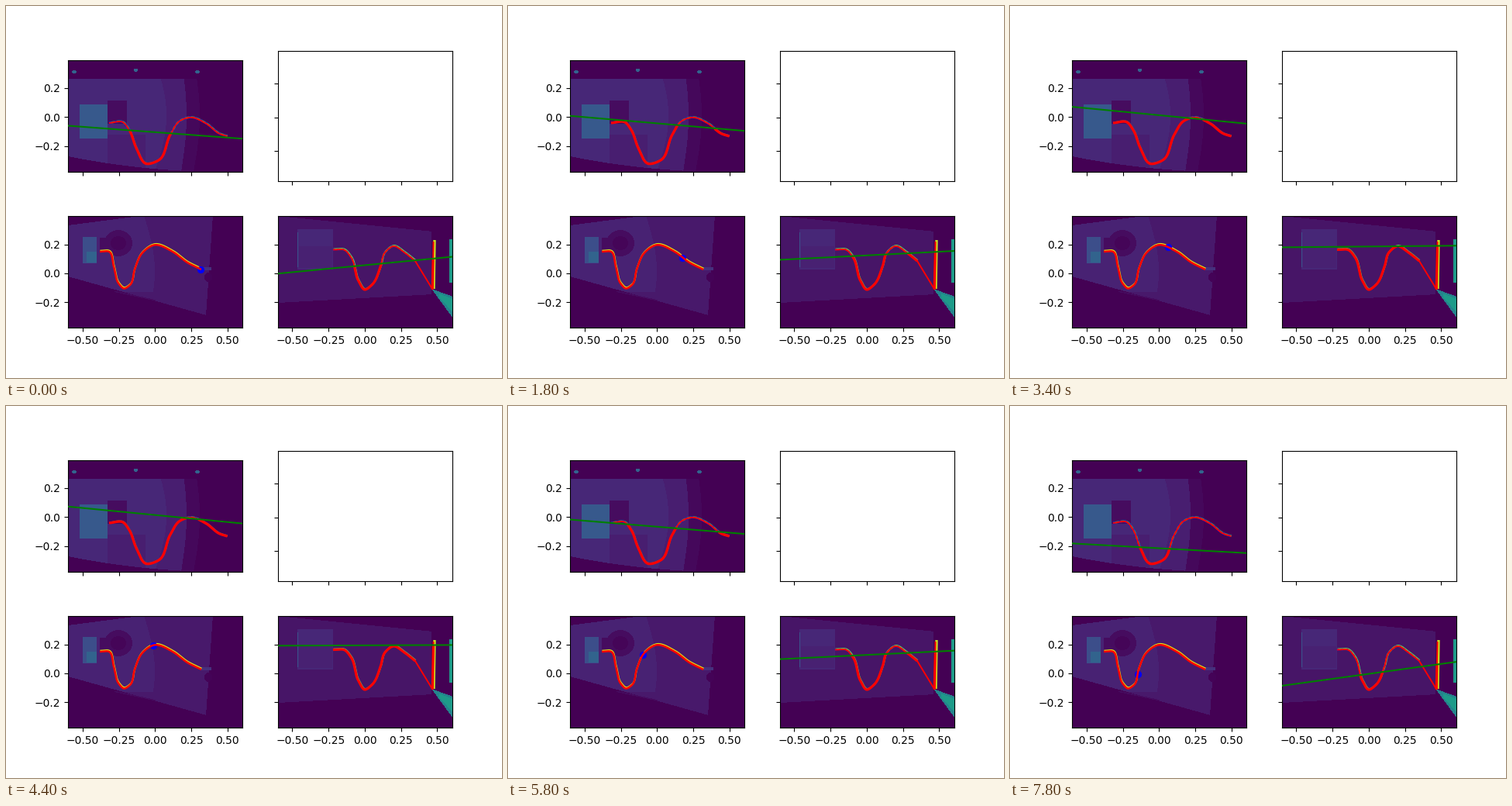
These frames come from a looping animation (640x480 px, 8000 ms). A matplotlib script:

```python
import numpy as np
import matplotlib.pyplot as plt
from matplotlib.animation import FuncAnimation

FRAMES, STEP = 40, 200
SCALE = 187.05                  # pixels per data unit
XLIM, YLIM = (-0.6009, 0.6044), (-0.3759, 0.3949)
VIR = plt.get_cmap("viridis")

fig, axes = plt.subplots(2, 2, sharex=True, sharey=True,
                         figsize=(6.4, 4.8), dpi=100)
top, side, right = axes[0, 0], axes[1, 0], axes[1, 1]
ORIGIN = {top: (192.4, 143.4), side: (192.4, 345), right: (462.95, 345)}
top.set(xlim=XLIM, ylim=YLIM, xticks=np.arange(-2, 3) * 0.25,
        yticks=[-0.2, 0, 0.2])


def to_data(ax, pts):
    """Stage pixels to the data units of one panel."""
    ox, oy = ORIGIN[ax]
    x, y = np.asarray(pts, float).T
    return (x - ox) / SCALE, (oy - y) / SCALE


def line(ax, pts, color, width, z, style="-"):
    return ax.plot(*to_data(ax, pts), style, color=color, lw=width, zorder=z,
                   solid_capstyle="butt")[0]


def hermite(t, keys, vals):
    """Cubic curve through key values."""
    slope = np.gradient(vals, keys)
    i = np.clip(np.searchsorted(keys, t, side="right") - 1, 0, len(keys) - 2)
    h = keys[i + 1] - keys[i]
    u = (t - keys[i]) / h
    return ((1 + 2 * u) * (1 - u) ** 2 * vals[i] + u * (1 - u) ** 2 * h * slope[i]
            + u * u * (3 - 2 * u) * vals[i + 1] + u * u * (u - 1) * h * slope[i + 1])


def lengths(pts):
    return np.r_[0, np.cumsum(np.hypot(*np.diff(pts, axis=0).T))]


def trace(*pts, n=300):
    """Smooth path through a few points."""
    pts = np.array(pts, float)
    s = lengths(pts)
    t = np.linspace(0, s[-1], n)
    return np.column_stack([hermite(t, s, pts[:, i]) for i in (0, 1)])


# Background scenes: levels laid over each other on a panel-sized grid
X, Y = np.meshgrid(np.arange(226) + 0.5, np.arange(144) + 0.5)
BULGE = np.sin(np.pi * Y / 144)


def rect(x0, y0, x1, y1):
    return (X > x0) & (X < x1) & (Y > y0) & (Y < y1)


def disc(x, y, rx, ry):
    return ((X - x) / rx) ** 2 + ((Y - y) / ry) ** 2 < 1


def scene(ax, *layers):
    level = np.zeros_like(X)
    for value, mask in layers:
        level[mask] = value
    ax.imshow(level, cmap=VIR, vmin=0, vmax=1, extent=XLIM + YLIM,
              interpolation="nearest", zorder=0)


sheet = (Y > 25) & (Y < 124 + 0.2 * X - 0.0005 * X ** 2)
scene(top,
      (0.02, sheet & (X < 162 + 8 * BULGE)),
      (0.085, sheet & (X < 146 + 7 * BULGE)),
      (0.11, sheet & (X < 112 + 15 * BULGE)),
      (0.085, sheet & rect(51, 96, 100, 144)),
      (0.035, rect(51, 53, 76, 82)),
      (0.28, rect(15, 58, 51, 101.5)),
      *[(0.32, disc(8 + 79.5 * i, 15 + 1.2 * (-1) ** i, 3, 2)) for i in range(3)])

sheet = (Y > 13 - 0.13 * X) & (Y < 78 + 0.28 * X) & (X < 187 - 0.07 * Y)
scene(side,
      (0.07, sheet),
      (0.095, sheet & (X < 98 + 14 * BULGE) & (Y < 98)),
      (0.035, (abs(Y - 84 - 0.22 * X) < 0.8) & (X > 60) & (X < 113)),
      (0.24, rect(19, 28, 37, 62)),
      (0.32, rect(24, 47, 37, 61)),
      (0.035, disc(65, 36, 18, 17) | rect(41, 29, 60, 47)),
      (0.015, disc(65, 36, 10, 9)),
      (0.14, rect(172, 67, 185, 71)),
      (0.01, disc(181, 79, 5, 6)))

beam = X - 198
scene(right,
      (0.055, (Y > 1 + 0.1 * X) & (Y < 112 - 0.055 * X) & (beam < 0)),
      (0.11, rect(24.5, 18, 71.5, 70)),
      (0.09, rect(27, 40, 70, 68)),
      (0.25, rect(24.5, 22, 26, 67)),
      (0.45, (Y > 94 + 0.36 * beam) & (Y < 94 + 1.36 * beam)),
      (0.55, (Y > 96 + 0.4 * beam) & (Y < 94 + 1.1 * beam) & (beam > 10)),
      (0.55, rect(221, 31, 226, 86)))

# Detected waves, one per camera panel
wave_a = trace((133, 151), (151, 150), (159, 160), (168, 183), (181, 203.5),
               (197, 199), (212, 166), (224, 148.5), (238, 143.8), (258, 151.5),
               (276, 165), (285.5, 168))
wave_b = trace((121, 317), (133, 317), (139, 336), (146, 359), (152, 364.5),
               (160, 360), (166, 340), (176, 318.5), (191, 308.5), (215, 317),
               (234, 331), (252, 340))
wave_c = trace((422, 314.5), (437, 315), (445, 324), (455, 355), (463, 366),
               (472, 360), (483, 337), (489, 318), (500, 310), (514, 318),
               (528, 329))
bar = np.linspace((550.3, 365.5), (551.6, 304), 60)

line(top, wave_a + (0.3, -0.3), VIR(0.5), 1.9, 2)
line(top, wave_a, "blue", 2, 3, ":")
line(side, wave_b + (0.4, -1.2), VIR(0.95), 1.6, 2)
line(side, wave_b, "red", 1.8, 5)
line(right, wave_c + (0.5, -0.7), VIR(0.75), 1.8, 2)
line(right, wave_c, "blue", 1.6, 3, ":")
line(right, [(552, 365), (553, 302)], VIR(0.92), 2.4, 2)

# Moving parts
parts_c = np.vstack([wave_c, bar])
line(top, wave_a, "red", 1.4, 4)
line(right, parts_c, "red", 1.4, 4)
bold_a = line(top, wave_a, "red", 2.4, 5)
bold_c = line(right, wave_c, "red", 2.3, 5)
bold_bar = line(right, bar, "red", 2.3, 5)
guide_a = line(top, wave_a[:2], "green", 1.5, 6)
guide_c = line(right, wave_c[:2], "green", 1.5, 6)
dot, = side.plot([], [], "o", color="blue", ms=6, mew=0.6, zorder=4)

CREST = np.array([191, 308.5])
path = wave_b[::-1]
path_s = lengths(path)


def place(ax, guide, x0, ends, bolds):
    """Set a guide line and thicken the waves below it."""
    x = np.array([x0, x0 + 225.5])
    guide.set_data(*to_data(ax, np.column_stack([x, ends])))
    for bold, wave in bolds:
        limit = ends[0] + (ends[1] - ends[0]) * (wave[:, 0] - x0) / 225.5
        below = (wave[:, 1] > limit)[:, None]
        bold.set_data(*to_data(ax, np.where(below, wave, np.nan)))


def update(k):
    t = k * STEP / 1000
    s = 1 + 17 * t - 0.25 * t * t
    pos = np.array([np.interp(s, path_s, path[:, i]) for i in (0, 1)])
    dot.set_data(*to_data(side, [pos]))
    # each guide end depends linearly on the tracked point
    dx, dy = pos - CREST
    place(top, guide_a, 80,
          (129.2 - 0.174 * dx + 1.151 * dy, 151.2 - 0.142 * dx + 0.921 * dy),
          [(bold_a, wave_a)])
    place(right, guide_c, 350.5,
          (308.8 - 0.078 * dx + 1.327 * dy, 308.2 - 0.032 * dx + 0.557 * dy),
          [(bold_c, wave_c), (bold_bar, bar)])
    return dot, guide_a, guide_c, bold_a, bold_c, bold_bar


anim = FuncAnimation(fig, update, frames=FRAMES, interval=STEP,
                     repeat=True, repeat_delay=0, blit=False)
plt.show()
```
